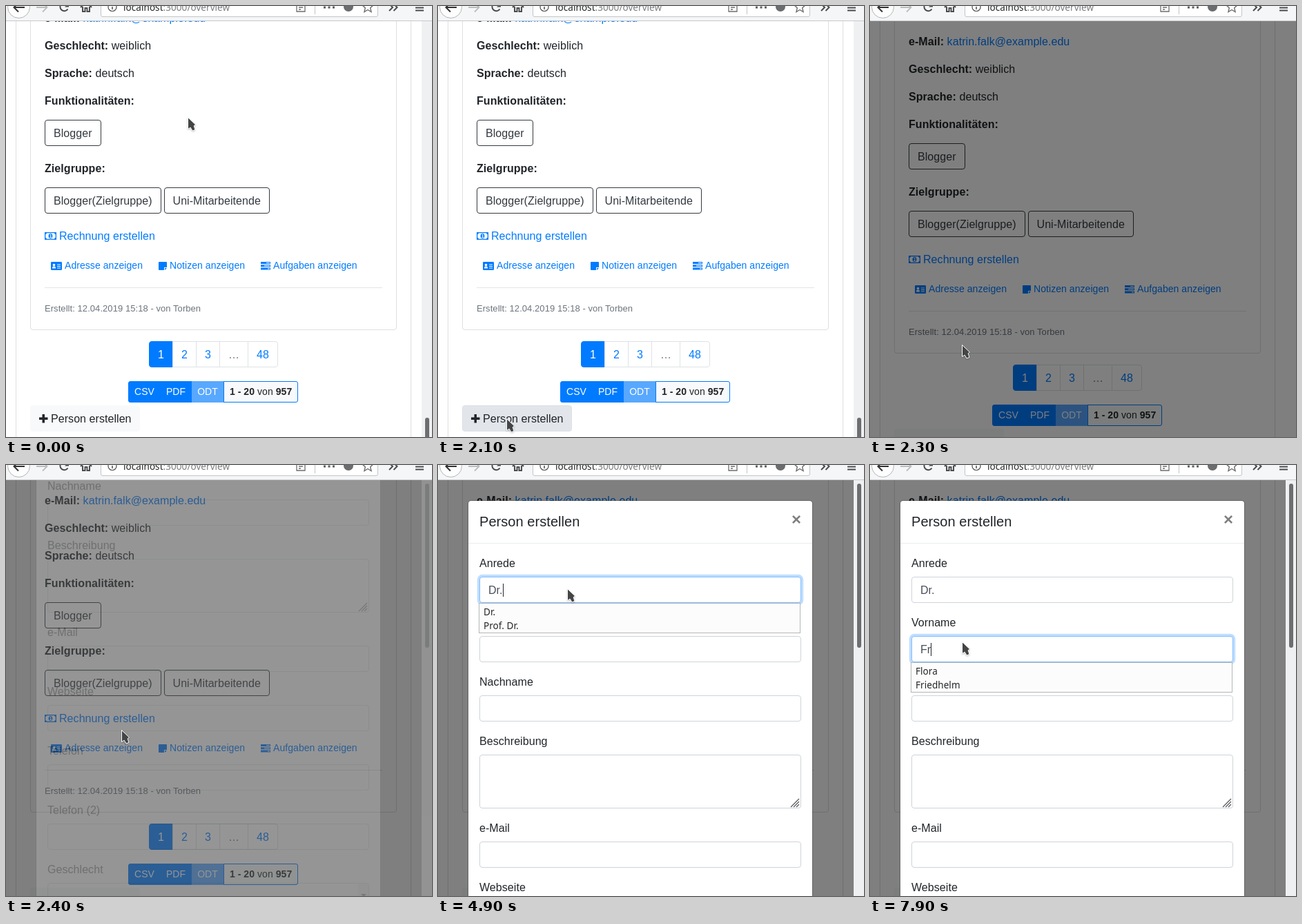
These frames come from a looping animation (617 by 625 pixels, 8 s). An HTML page:

```html
<!DOCTYPE html>
<html lang="de">
<head>
<meta charset="utf-8">
<title>Person erstellen</title>
<style>
  html, body { margin: 0; width: 100%; height: 100%; overflow: hidden; background: #fff; }
  #stage { position: relative; width: 617px; height: 625px; overflow: hidden; background: #fff;
    font: 16px/24px "Liberation Sans", Arial, sans-serif; letter-spacing: .06px; color: #212529; }
  #stage div { position: absolute; box-sizing: border-box; white-space: nowrap; }
  #stage svg { position: absolute; left: 0; top: 0; overflow: visible; }
  #page, #shade, #chrome, #modal { left: 0; top: 0; width: 617px; }
  #page { height: 700px; }
  #shade { height: 625px; background: #000; opacity: 0; }
  #stage .row { display: flex; }
  #stage .row > div { position: static; }
  .frame { border: 1px solid #dfdfdf; }
  .link, .small { color: #007bff; }
  .small { font-size: 14px; line-height: 21px; }
  .tag { border: 1px solid #343a40; border-radius: 4px; padding: 7px 12px 5px; color: #343a40; height: 38px; }
  .pages > div { border: 1px solid #dee2e6; padding: 7px 12px 5px; height: 38px; margin-left: -1px; color: #007bff; background: #fff; }
  .pages > div:first-child { margin-left: 0; border-color: #007bff; background: #007bff; color: #fff; border-radius: 4px 0 0 4px; }
  .pages > div:nth-child(4) { color: #6c757d; }
  .pages > div:last-child { border-radius: 0 4px 4px 0; }
  .group > div { border: 1px solid #007bff; padding: 4px 8px; height: 31px; font-size: 14px; line-height: 21px; margin-left: -1px; background: #007bff; color: #fff; }
  .group > div:first-child { margin-left: 0; border-radius: 3px 0 0 3px; }
  .group > div:nth-child(3) { opacity: .65; }
  .group > div:last-child { background: #f8f9fa; color: #212529; border-radius: 0 3px 3px 0; }
  #add { left: 35px; top: 579px; width: 159px; height: 38px; padding: 7px 0 0 29px; border: 1px solid #f8f9fa; border-radius: 4px; background: #f8f9fa; }
  #add.over { background: #e2e6ea; border-color: #dae0e5; }
  #box { left: 43px; top: 51px; width: 500px; height: 1500px; background: #fff; background-clip: padding-box; border: 1px solid rgba(0,0,0,.2); border-radius: 5px; }
  .field { left: 60px; width: 466px; height: 38px; padding: 7px 12px 5px; background: #fff; border: 1px solid #ced4da; border-radius: 4px; color: #495057; }
  .caret { display: inline-block; width: 1px; height: 19px; margin-right: -1px; background: #212529; vertical-align: -4px; }
  #list { left: 59px; width: 466px; overflow: hidden; padding: 2px 6px; background: #fcfcfc; border: 1px solid #b4b5b6; color: #232627; font: 13.5px/20px "Noto Sans", sans-serif; }
  #track { left: 602px; top: 22px; width: 15px; height: 603px; background: #eff0f1; }
  #thumb { left: 5px; width: 6px; border-radius: 3px; background: #6c6e70; }
  #chrome { height: 22px; background: #f5f6f7; border-bottom: 1px solid #c8c9ca; overflow: hidden; }
  #url { left: 170px; top: -8px; font: 13.5px/20px "Noto Sans", sans-serif; color: #232627; }
  #url span { color: #7b7d7f; }
</style>
</head>
<body>
<div id="stage">
  <div id="page">
    <div class="frame" style="left:14px;top:-20px;width:573px;height:800px"></div>
    <div class="frame" style="left:35px;top:-60px;width:531px;height:530px;border-radius:4px"></div>
    <div class="row" style="left:56px;top:165px"><div class="tag">Blogger</div></div>
    <div class="row" style="left:56px;top:263px;gap:4px"><div class="tag">Blogger(Zielgruppe)</div><div class="tag">Uni-Mitarbeitende</div></div>
    <div style="left:56px;top:408px;width:489px;height:1px;background:#e5e5e5"></div>
    <div class="row pages" style="left:207px;top:486px"><div>1</div><div>2</div><div>3</div><div>…</div><div>48</div></div>
    <div class="row group" style="left:177px;top:544px"><div>CSV</div><div>PDF</div><div>ODT</div><div><b>1 - 20</b> von <b>957</b></div></div>
    <div id="add">Person erstellen</div>
    <svg width="1" height="1" fill="#007bff">
      <path d="M48 596.5h4.5v-4.5h3.500v4.500h4.500v3.500h-4.500v4.500h-3.500v-4.500h-4.500z" fill="#212529"/>
      <path fill-rule="evenodd" d="M56 328h17v11H56zM59 329.300a2 2 0 0 1-1.700 1.700v5a2 2 0 0 1 1.700 1.700h11a2 2 0 0 1 1.700-1.700v-5a2 2 0 0 1-1.700-1.700z"/>
      <ellipse cx="64.500" cy="333.500" rx="2.900" ry="3.500"/>
      <path d="M63.500 332l1.300-.8v4M63.300 335.500h2.800" stroke="#fff" fill="none"/>
      <rect x="65" y="371" width="16" height="12" rx="1.300"/>
      <path d="M67 380.500c0-2.500 1-3 2.500-3s2.500.5 2.500 3zM74 374.500h5v1h-5zM74 377h5v1h-5zM74 379.500h5v1h-5z" fill="#fff"/>
      <circle cx="69.500" cy="375.500" r="1.800" fill="#fff"/>
      <path d="M222 371h10q1 0 1 1v7h-4v4h-7q-1 0-1-1v-10q0-1 1-1zM230 380h3l-3 3z"/>
      <path d="M369 371h14v3h-14zM369 375.200h14v3h-14zM369 379.400h14v3h-14z"/>
      <path d="M377 372h5v1h-5zM374 376.200h8v1h-8zM379 380.400h3v1h-3z" fill="#fff"/>
    </svg>
  </div>
  <div id="shade"></div>
  <div id="modal">
    <div id="box"></div>
    <div style="left:60px;top:67px;font-size:20px;line-height:30px">Person erstellen</div>
    <div style="left:512px;top:67px;font:bold 24px/24px 'Liberation Sans',sans-serif;color:#000;opacity:.5">×</div>
    <div style="left:44px;top:113px;width:498px;height:1px;background:#e9ecef"></div>
  </div>
  <div id="list"></div>
  <div id="track"><div id="thumb"></div></div>
  <div id="chrome">
    <div style="left:137px;top:-20px;width:402px;height:36px;background:#fff;border:1px solid #c3c4c5;border-radius:3px"></div>
    <div id="url">localhost<span>:3000/overview</span></div>
    <svg width="1" height="1" fill="none" stroke="#4a4c4e" stroke-width="1.800">
      <circle cx="18.500" cy="1.500" r="16" fill="#fdfdfd" stroke="#b3b4b5" stroke-width="1"/>
      <path d="M27 2H12M18-4.500L11.500 2l6.500 6.500" stroke="#303234" stroke-width="2"/>
      <path d="M44 2h15M53-4.500L59.500 2 53 8.500" stroke="#bcbdbe"/>
      <path d="M89.500 4.500A6 6 0 1 1 90-1" stroke-width="2"/>
      <path d="M91-4v5.500h-6z" fill="#4a4c4e" stroke="none"/>
      <path d="M108 2l8-8 8 8M111 1v7h3.500V3h3v5h3.500V1" stroke-width="2"/>
      <circle cx="154" cy="1.500" r="6" stroke-width="1.200"/><path d="M154 1v4M154-2.500v1.500" stroke-width="1.500"/>
      <path d="M421-6h12V8h-12zM424-1h6M424 2h6M424 5h3" stroke="#6a6c6e" stroke-width="1.300"/>
      <path d="M447.500 0v12" stroke="#c3c4c5" stroke-width="1"/>
      <path d="M460 2h3M466.500 2h3M473 2h3" stroke="#5c5e60" stroke-width="3"/>
      <circle cx="496" cy="1" r="7" fill="#6a6c6e" stroke="none"/>
      <path d="M524-7l2.300 5.300 5.700.6-4.300 3.800 1.300 5.800-5-3-5 3 1.300-5.800-4.300-3.800 5.700-.6z" stroke="#6a6c6e" stroke-width="1.400"/>
      <path d="M555-3l5 5-5 5M561.500-3l5 5-5 5" stroke-width="2"/>
      <path d="M593 2.500h12M593 6.500h12M593-2h12" stroke-width="2"/>
    </svg>
  </div>
  <svg id="arrow" width="1" height="1"><path d="M.5.5V17.500L4.200 15.200 7 20l4-1.500-1.800-5.700 2.300-1.800z" fill="#434546" stroke="#fff" stroke-width="1" style="filter:drop-shadow(0 1px 1px rgba(0,0,0,.25))"/></svg>
  <svg id="beam" width="1" height="1" fill="none"><path d="M-3-8H3M0-8V8M-3 8H3" stroke="#fff" stroke-width="3"/><path d="M-3-7.500H3M0-7.500V7.500M-3 7.500H3" stroke="#303234"/></svg>
</div>
<script>
const LOOP = 8000;
const $ = id => document.getElementById(id);

function put(parent, html, x, y, cls = "") {
  const el = document.createElement("div");
  el.className = cls;
  el.innerHTML = html;
  el.style.left = x + "px";
  el.style.top = y + "px";
  parent.append(el);
  return el;
}

const page = $("page"), modal = $("modal");
[
  ["<b>e-Mail:</b> <span class=link>katrin.falk@example.edu</span>", 6],
  ["<b>Geschlecht:</b> weiblich", 46],
  ["<b>Sprache:</b> deutsch", 86],
  ["<b>Funktionalitäten:</b>", 126],
  ["<b>Zielgruppe:</b>", 224]
].forEach(([html, y]) => put(page, html, 56, y));
put(page, "Rechnung erstellen", 77, 322, "link");
put(page, "Adresse anzeigen", 85, 366, "small");
put(page, "Notizen anzeigen", 237, 366, "small");
put(page, "Aufgaben anzeigen", 387, 366, "small");
const made = put(page, "Erstellt: 12.04.2019 15:18 - von Torben", 56, 429);
made.style.cssText += "font-size:13px;line-height:19px;color:#6c757d";

// Form: labels with a box below each
const fields = {};
let y = 130;
for (const name of ["Anrede", "Vorname", "Nachname", "Beschreibung", "e-Mail", "Webseite", "Telefon", "Telefon (2)", "Geschlecht"]) {
  const tall = name === "Beschreibung" || name === "Geschlecht";
  put(modal, name, 60, y + 1);
  fields[name] = put(modal, "", 60, y + 32, "field");
  if (tall) fields[name].style.height = "78px";
  y += tall ? 126 : 86;
}
fields.Beschreibung.innerHTML = '<svg width="1" height="1" stroke="#55585a" stroke-width="1.200"><path d="M450 75l12-12M454 75l8-8M458 75l4-4"/></svg>';
fields.Geschlecht.innerHTML = '<svg width="1" height="1"><path d="M449 0h15v76h-15z" fill="#eff0f1"/><path d="M453 15h8l-4 4z" fill="#55585a"/></svg>';

// Pointer moves: start, number of 100 ms steps, end x, end y
const moves = [
  [400, 4, 226, 265], [1000, 3, 81, 426], [1400, 6, 99, 598],
  [2300, 2, 167, 384], [2900, 1, 204, 179], [3000, 3, 187, 179],
  [5800, 1, 194, 137], [6300, 5, 133, 256]
];

function pointer(t) {
  let x = 263, y = 161;
  for (const [start, n, ex, ey] of moves) {
    if (t < start) break;
    const p = Math.min(1, (Math.floor((t - start) / 100) + 1) / n);
    const e = p * p * (3 - 2 * p);
    x += (ex - x) * e;
    y += (ey - y) * e;
  }
  return [x, y];
}

const steps = [
  [0, { scroll: 0, shade: 0, over: false, bar: "page", shift: 0, alpha: 0, beam: false,
        glow: { Anrede: 0, Vorname: 0 }, text: { Anrede: "", Vorname: "" }, caret: "", list: [] }],
  [1800, { over: true }],
  [2200, { scroll: 34, shade: .19, bar: "" }],
  [2300, { shade: .5, over: false }],
  [2400, { bar: "modal", shift: -284, alpha: .17 }],
  [2900, { shift: 0, alpha: 1, beam: true }],
  [3400, { glow: { Anrede: .35, Vorname: 0 }, caret: "Anrede" }],
  [3500, { glow: { Anrede: .8, Vorname: 0 } }],
  [3600, { glow: { Anrede: 1, Vorname: 0 } }],
  [4300, { text: { Anrede: "D", Vorname: "" } }],
  [4400, { list: ["Dr."], beam: false }],
  [4600, { text: { Anrede: "Dr", Vorname: "" } }],
  [4700, { list: ["Dr.", "Prof. Dr."] }],
  [4900, { text: { Anrede: "Dr.", Vorname: "" } }],
  [5800, { caret: "" }],
  [6000, { list: [], glow: { Anrede: .4, Vorname: 0 } }],
  [6100, { glow: { Anrede: 0, Vorname: 0 } }],
  [6600, { beam: true }],
  [6900, { glow: { Anrede: 0, Vorname: .5 }, caret: "Vorname" }],
  [7000, { glow: { Anrede: 0, Vorname: 1 } }],
  [7700, { text: { Anrede: "Dr.", Vorname: "F" } }],
  [7800, { list: ["Flora", "Friedhelm"], beam: false }],
  [7900, { text: { Anrede: "Dr.", Vorname: "Fr" } }]
];

const mix = (a, b, p) => a + (b - a) * p;

function draw(t) {
  const s = Object.assign({}, ...steps.filter(([at]) => at <= t).map(step => step[1]));
  page.style.top = s.scroll + "px";
  $("shade").style.opacity = s.shade;
  $("add").classList.toggle("over", s.over);
  modal.style.top = s.shift + "px";
  modal.style.opacity = s.alpha;

  // The form's scrollbar fades in with it
  const inModal = s.bar === "modal";
  $("track").style.display = s.bar ? "" : "none";
  $("track").style.opacity = inModal ? s.alpha : 1;
  $("thumb").style.top = (inModal ? 5 : 575) + "px";
  $("thumb").style.height = (inModal ? 238 : 60) + "px";

  for (const name of ["Anrede", "Vorname"]) {
    const g = s.glow[name], el = fields[name];
    el.style.borderColor = `rgb(${mix(206, 128, g)},${mix(212, 189, g)},${mix(218, 255, g)})`;
    el.style.boxShadow = `0 0 0 ${3.2 * g}px rgba(0,123,255,${.25 * g})`;
    const html = s.text[name] + (s.caret === name ? '<span class="caret"></span>' : "");
    if (el.dataset.html !== html) el.innerHTML = el.dataset.html = html;
  }

  const list = $("list");
  list.style.display = s.list.length ? "" : "none";
  list.style.top = (t < 6000 ? 200 : 286) + "px";
  list.style.height = 4 + 20 * s.list.length + "px";
  list.innerHTML = s.list.join("<br>");

  const [x, y] = pointer(t);
  for (const id of ["arrow", "beam"]) {
    $(id).style.display = (id === "beam") === s.beam ? "" : "none";
    $(id).style.transform = `translate(${Math.round(x)}px,${Math.round(y)}px)`;
  }
}

const start = performance.now();
function tick() {
  draw((performance.now() - start) % LOOP);
  requestAnimationFrame(tick);
}
tick();
</script>
</body>
</html>
```
